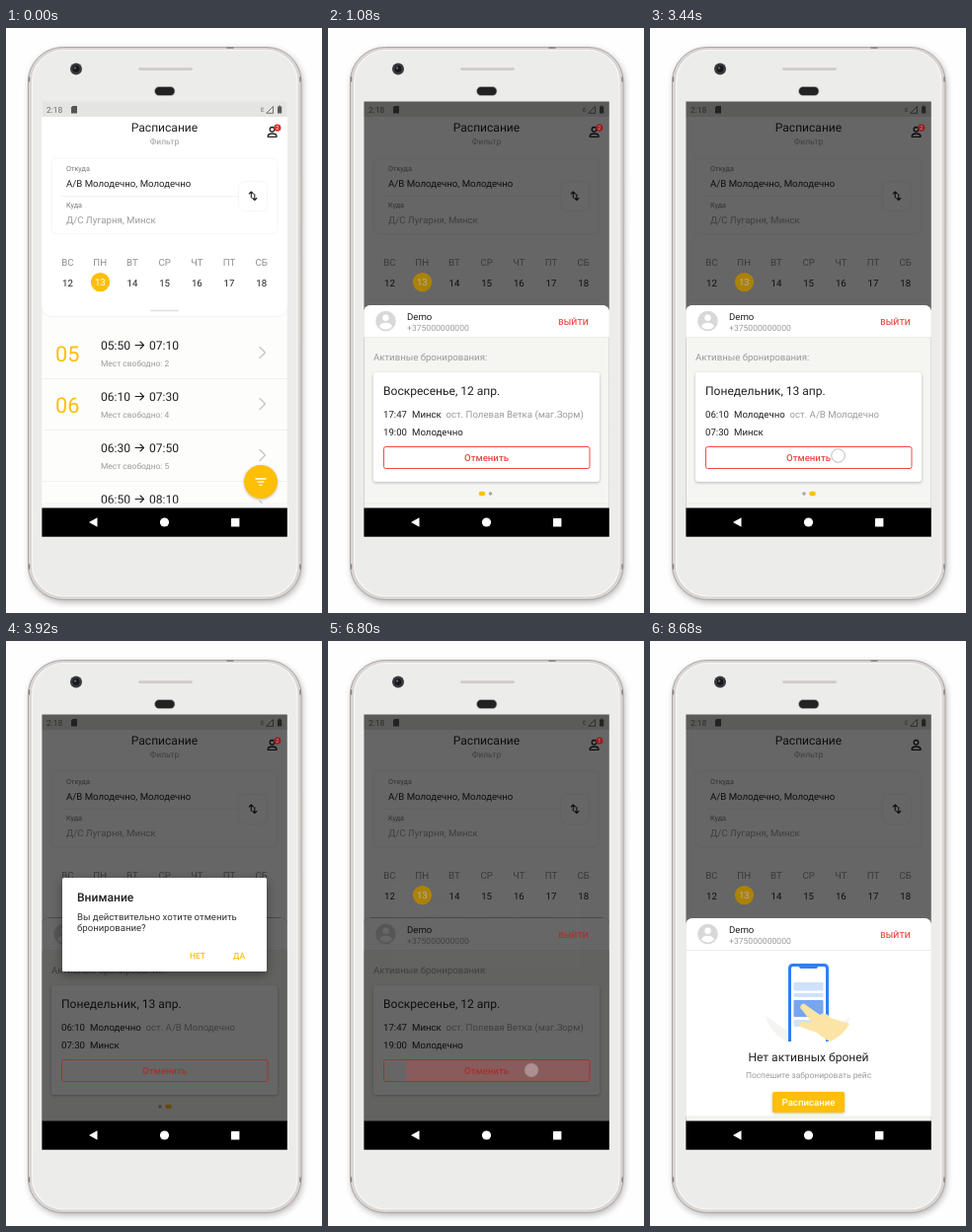
These frames come from a looping animation (320x593 px, 10000 ms). An HTML page:

```html
<!DOCTYPE html>
<html lang="ru">
<head>
<meta charset="utf-8">
<title>Расписание</title>
<style>
html, body { margin: 0; width: 100%; height: 100%; overflow: hidden; background: #fefefe; }
svg { display: block; width: 320px; height: 593px; }
text { font-family: Roboto, sans-serif; white-space: pre; text-rendering: geometricPrecision; }
.line { fill: none; stroke-linecap: round; stroke-linejoin: round; }
.lift { filter: drop-shadow(0 1px 1.5px rgba(0, 0, 0, .25)); }
.soft { filter: drop-shadow(0 0 1px rgba(0, 0, 0, .1)); }
</style>
</head>
<body>
<svg id="stage" viewBox="0 0 320 593"></svg>
<script>
const AMBER = '#fdbf07', RED = '#ee4a45', GREY = '#9b9b9b', INK = '#212121';
const LOOP = 10000, PAGE = 248;

// Markup helpers
const text = (x, y, size, str, fill = INK, extra = '') =>
  `<text x="${x}" y="${y}" font-size="${size}" fill="${fill}" ${extra}>${str}</text>`;
const mid = (x, y, size, str, fill, weight = 400) =>
  text(x, y, size, str, fill, `text-anchor="middle" font-weight="${weight}"`);
const rect = (x, y, w, h, fill, r = 0, extra = '') =>
  `<rect x="${x}" y="${y}" width="${w}" height="${h}" rx="${r}" fill="${fill}" ${extra}/>`;
const circle = (x, y, r, fill, extra = '') =>
  `<circle cx="${x}" cy="${y}" r="${r}" fill="${fill}" ${extra}/>`;
const line = (d, color, width = 1) =>
  `<path class="line" d="${d}" stroke="${color}" stroke-width="${width}"/>`;
const shape = (d, fill, extra = '') => `<path d="${d}" fill="${fill}" ${extra}/>`;
const group = (id, content, extra = '') => `<g id="${id}" ${extra}>${content}</g>`;

const phone = () =>
  rect(24, 22, 276, 560, '#000', 35, 'opacity=".3" style="filter:blur(3.5px)"') +
  rect(297, 150, 3.4, 53, '#d8d2ce', 1) + rect(297, 232, 3.4, 91, '#d8d2ce', 1) +
  rect(22.5, 19.5, 276.5, 560, '#d9d5d3', 35, 'stroke="#aca6a3"') +
  rect(26.5, 22.5, 268.5, 553.5, '#ecedeb', 32, 'stroke="#f7f7f6" stroke-width="1.2"') +
  line('M23.5 50v4M298 50v4M23.5 544v4M298 544v4M224 20h6', '#85807d', 1.4) +
  rect(134, 40.2, 55, 2.8, '#cfcbc8', 1.4) +
  circle(71, 41.5, 6, '#3a3a3d') + circle(71, 41.5, 3.4, '#17181c') + circle(70, 40.5, 1.2, '#59616f') +
  rect(150.5, 59.5, 20.5, 9, '#222', 4.5, 'stroke="#bbb" stroke-width=".6"');

const statusBar = () =>
  rect(36, 74, 249, 16, '#e4e4e2') +
  text(41, 85.6, 8.4, '2:18', '#6b6b6b') +
  shape('M67.5 79H72v7.5h-6V80.5z', '#555') +
  text(258, 84.5, 6, 'E', '#666') +
  line('M264 86L270.5 79.5V86z', '#666', .9) +
  rect(275, 79.5, 4.2, 7, '#5a5a5a', .6) + rect(276.2, 78.6, 1.8, 1, '#5a5a5a');

const day = (name, i) => {
  const x = 62.5 + i * 32.7;
  return mid(x, 241, 9.65, name, '#8d8d8d') + (i === 1 ? '' : mid(x, 261.5, 9.65, 12 + i));
};

const trip = ([from, to, seats, hour], i) => {
  const y = 326 + i * 52;
  return (hour ? text(50, y + 11.5, 21.7, hour, AMBER) : '') +
    text(96, y, 12.06, from) + text(145, y, 12.06, to) +
    line(`M131 ${y - 4.5}h8.5m-3.5-3.5l3.5 3.5l-3.5 3.5`, INK, 1.1) +
    text(96, y + 16.5, 8.44, 'Мест свободно: ' + seats, GREY) +
    line(`M257 ${y - 2.5}l5.5 5.5l-5.5 5.5`, '#c9c9c9', 1.5) +
    line(`M37 ${y + 29.5}h248`, '#efefef', .8);
};

const app = () =>
  rect(36, 74, 249, 413, '#fdfdfc') +
  [['05:50', '07:10', 2, '05'], ['06:10', '07:30', 4, '06'], ['06:30', '07:50', 5], ['06:50', '08:10', 3]].map(trip).join('') +
  rect(36, 482, 249, 5, '#fbfbfb') + line('M37 482h248', '#ececec', .7) +
  shape('M36 75H285V280Q285 292 273 292H48Q36 292 36 280z', '#fff', 'class="soft"') +
  statusBar() +
  mid(160.5, 105, 12.06, 'Расписание') + mid(160.5, 117.5, 8.44, 'Фильтр', GREY) +
  circle(269.5, 102.8, 2.3, 'none', 'stroke="#222" stroke-width="1.3"') +
  line('M265.2 110.3v-1.3q1-2 4.4-2t4.4 2v1.3z', '#222', 1.3) +
  rect(46.5, 132.5, 228, 75.5, '#fff', 5, 'class="soft"') +
  text(61, 145, 7.24, 'Откуда', '#777') + text(61, 160.5, 9.65, 'А/В Молодечно, Молодечно') +
  line('M56 170.5h180', '#f0f0f0', .8) +
  text(61, 182, 7.24, 'Куда', '#777') + text(61, 198, 9.65, 'Д/С Лугарня, Минск', GREY) +
  rect(236, 156, 28, 29, '#fff', 6, 'class="soft"') +
  line('M248.3 172v-6m-2 2l2-2l2 2M251.8 168.5v6m-2-2l2 2l2-2', INK, 1.1) +
  ['ВС', 'ПН', 'ВТ', 'СР', 'ЧТ', 'ПТ', 'СБ'].map(day).join('') +
  line('M147 286.5h27', '#dedede', 1.4) +
  circle(258, 460, 17, AMBER, 'class="lift"') +
  line('M253 457h10M255 460.2h6M257 463.4h2', '#fff', 1.3);

const card = (x, title, from, stop, to) =>
  `<g transform="translate(${x})">` +
  rect(46, 349, 229, 111, '#fff', 3, 'class="lift"') +
  text(56, 371.5, 12.06, title) +
  text(56, 395, 9.65, from[0]) +
  text(85, 395, 9.65, `${from[1]}<tspan dx="4.8" fill="${GREY}">${stop}</tspan>`) +
  text(56, 412.7, 9.65, to[0]) + text(85, 412.7, 9.65, to[1]) + '</g>';

const cancel = x =>
  `<g transform="translate(${x})">` +
  rect(56.5, 424.5, 208.5, 22, 'none', 2, `stroke="${RED}"`) +
  mid(160.5, 439, 9.65, 'Отменить', RED, 500) + '</g>';

const emptyState = () =>
  rect(36, 314, 249, 168, '#fff') +
  shape('M117 380Q121 396 138 406H184Q199 396 203 381L180 396H140z', '#f4f4f3') +
  shape('M141.5 406V332Q141.5 328.5 145 328.5H176Q179.5 328.5 179.5 332V406', '#fff', 'stroke="#2f7ff5" stroke-width="3"') +
  rect(151, 327.5, 19, 4.5, '#2f7ff5', 2) +
  rect(145.5, 346, 30, 8.5, '#cfe1fb', 1) + rect(145.5, 357, 30, 4, '#cfe1fb', 1) +
  rect(145.5, 364, 30, 17, '#76a5f1', 1) + rect(145.5, 384, 30, 7, '#cfe1fb', 1) +
  shape('M153 369Q155 366 158 369L172 379Q177 375 183 382L202 388Q197 399 182 406Q174 402 169 397L152 391Q149 387 155 386L164 387L154 374Q151 372 153 369z', '#fbe4a6') +
  mid(160.5, 426, 12.06, 'Нет активных броней') +
  mid(160.5, 443, 8.44, 'Поспешите забронировать рейс', GREY) +
  rect(124, 457, 73, 21, AMBER, 2, 'class="lift"') +
  mid(160.5, 471, 9.65, 'Расписание', '#fff', 500);

const SHEET = 'M36 487V289Q36 281 44 281H277Q285 281 285 289V487z';
const sheet = () =>
  shape(SHEET, '#f5f5f2') +
  shape('M36 313.5V289Q36 281 44 281H277Q285 281 285 289V313.5z', '#fff') +
  line('M37 313.7h248', '#e6e6e4', .8) +
  circle(58.5, 297, 10.3, '#d8d8d8') + circle(58.5, 293.8, 3.2, '#fff') +
  shape('M52 302.5Q53 298.7 58.5 298.7T65 302.5Q62.5 305.5 58.5 305.5T52 302.5z', '#fff') +
  text(80, 296, 9.65, 'Demo') + text(80, 307, 8.6, '+375000000000', GREY) +
  group('bookings',
    text(46, 337, 9.65, 'Активные бронирования:', GREY) +
    group('pager',
      card(0, 'Воскресенье, 12 апр.', ['17:47', 'Минск'], 'ост. Полевая Ветка (маг.Зорм)', ['19:00', 'Молодечно']) +
      card(PAGE, 'Понедельник, 13 апр.', ['06:10', 'Молодечно'], 'ост. А/В Молодечно', ['07:30', 'Минск'])) +
    group('dots', rect(0, 469.7, 0, 4.6, AMBER, 2.3, 'id="dotA"') + rect(0, 469.7, 0, 4.6, AMBER, 2.3, 'id="dotB"'))) +
  group('spinner', circle(161, 400, 11, 'none', `id="arc" pathLength="360" stroke="${AMBER}" stroke-width="1.8" opacity=".7"`)) +
  group('empty', emptyState()) +
  line('M37 482h248', '#e4e4e1', .7) +
  group('sheetDim', shape(SHEET, '#000', 'stroke="#000" opacity=".6"')) +
  group('rippleBox', circle(190, 434, 0, '#f0787d', 'id="ripple"'), 'clip-path="url(#button)"') +
  group('sheetHot',
    text(233.3, 300.5, 8.44, 'ВЫЙТИ', RED, 'font-weight="500" letter-spacing=".2"') +
    group('cancels', cancel(0) + cancel(PAGE)));

const dialog = () =>
  rect(57, 240, 207, 95, '#fff', 1.5, 'style="filter:drop-shadow(0 3px 5px rgba(0,0,0,.4))"') +
  text(72, 264, 12.06, 'Внимание', INK, 'font-weight="500"') +
  text(72, 282.5, 9.65, 'Вы действительно хотите отменить', '#333') +
  text(72, 293.7, 9.65, 'бронирование?', '#333') +
  text(186, 321.5, 8.44, 'НЕТ', AMBER, 'font-weight="500"') +
  text(230, 321.5, 8.44, 'ДА', AMBER, 'font-weight="500"');

stage.innerHTML =
  `<defs><clipPath id="screen">${rect(36.4, 74.5, 248.4, 412.5)}</clipPath>
   <clipPath id="button">${rect(56, 424, 209.5, 23, '#000', 2)}</clipPath></defs>` +
  phone() +
  group('view',
    app() +
    group('appDim', rect(36, 74, 249, 413, '#000')) +
    group('appHot',
      circle(95.5, 257.6, 9.6, AMBER) + mid(95.3, 261.3, 9.65, '13', '#fff') +
      group('badge', circle(274.8, 101.2, 3.6, '#e5282e') +
        mid(274.8, 103.2, 5.5, '2', '#fff').replace('<text', '<text id="count"'))) +
    group('sheet', sheet()) + group('dialog', dialog()),
    'clip-path="url(#screen)"') +
  rect(36.4, 486.5, 248.4, 29.2, '#000') +
  shape('M84 501L92.5 496.3V505.7z', '#fff') + circle(160.5, 501, 4.6, '#fff') + rect(228, 497, 8.4, 8.4, '#fff', .5) +
  circle(0, 0, 6.8, '#fff', 'id="touch" fill-opacity=".55" stroke="#aaa" stroke-width=".8"');

const $ = id => document.getElementById(id);
const set = (id, attrs) => { for (const k in attrs) $(id).setAttribute(k, attrs[k]); };
const show = (id, on) => set(id, { display: on ? 'inline' : 'none' });
const darken = (id, amount) => { $(id).style.filter = amount ? `brightness(${1 - amount})` : 'none'; };
const easeOut = p => 1 - (1 - p) ** 3;

// start, end, x, y, horizontal travel
const touches = [
  [400, 560, 270, 105, 0], [2360, 2600, 225, 400, -125], [3440, 3680, 190.5, 433.5, 0],
  [4520, 4720, 238, 318, 0], [6600, 6860, 206, 435, 0], [7760, 7960, 235.5, 321, 0]
];

function draw(t) {
  const ramp = (a, b) => Math.min(1, Math.max(0, (t - a) / (b - a)));
  const second = t >= 5560;
  const { tap, ok, loaded, x } = second
    ? { tap: 6600, ok: 7760, loaded: 8600, x: 206 }
    : { tap: 3440, ok: 4520, loaded: 5440, x: 190.5 };

  // Sheet and shading
  const shade = ramp(560, 800);
  set('appDim', { opacity: .6 * shade });
  darken('appHot', .32 * shade);
  set('sheet', { transform: `translate(0 ${206 * (1 - easeOut(ramp(580, 1040)))})` });
  const dimmed = t >= tap + 160 && t < ok + 200;
  show('sheetDim', dimmed);
  darken('sheetHot', dimmed ? .32 : 0);
  darken('rippleBox', dimmed ? .32 : 0);

  // Bookings pager
  const page = t < 5440 ? .5 * ramp(2360, 2600) + .5 * easeOut(ramp(2600, 2800)) : 0;
  for (const id of ['pager', 'cancels']) set(id, { transform: `translate(${-PAGE * page})` });
  [['dotA', 156, 1 - page], ['dotB', 164.5, page]].forEach(([id, cx, on]) => {
    const w = 3.6 + 3 * on, h = 3.6 + on;
    set(id, { x: cx - w / 2, width: w, y: 472 - h / 2, height: h, rx: h / 2, fill: on > .5 ? AMBER : '#a9a9a9' });
  });
  show('dots', t < 5440);

  // Loading and results
  const loading = t >= ok + 200 && t < loaded, empty = t >= 8600;
  const fade = t < 5440 ? 1 : ramp(5400, 5600);
  show('bookings', !loading && !empty);
  show('cancels', !loading && !empty);
  set('bookings', { opacity: fade });
  set('cancels', { opacity: fade });
  show('spinner', loading);
  show('empty', empty);
  show('badge', !empty);
  $('count').textContent = t < 5440 ? '2' : '1';
  if (loading) {
    const s = t - ok - 200, sweep = 18 + s * .4;
    set('arc', { 'stroke-dasharray': `${sweep} ${360 - sweep}`, transform: `rotate(${s * .19 - 88} 161 400)` });
  }

  // Cancel button ripple and confirmation
  set('ripple', {
    cx: x, r: Math.min(210, Math.max(0, (t - tap - 80) * 1.05)),
    opacity: .55 * (1 - ramp(tap + 280, tap + 480))
  });
  const seen = ramp(tap + 200, tap + 360) * (1 - ramp(ok + 120, ok + 240));
  const scale = .92 + .08 * easeOut(ramp(tap + 200, tap + 440));
  show('dialog', seen > 0);
  set('dialog', { opacity: seen, transform: `translate(160.5 287.5) scale(${scale}) translate(-160.5 -287.5)` });

  // Finger
  const finger = touches.find(([a, b]) => t >= a && t < b);
  show('touch', finger);
  if (finger) {
    const [a, b, fx, fy, dx] = finger;
    set('touch', { cx: fx + dx * ramp(a, b), cy: fy, opacity: 1 - ramp(b - 100, b) });
  }
}

const start = performance.now();
(function tick() {
  draw((performance.now() - start) % LOOP);
  requestAnimationFrame(tick);
})();
</script>
</body>
</html>
```
